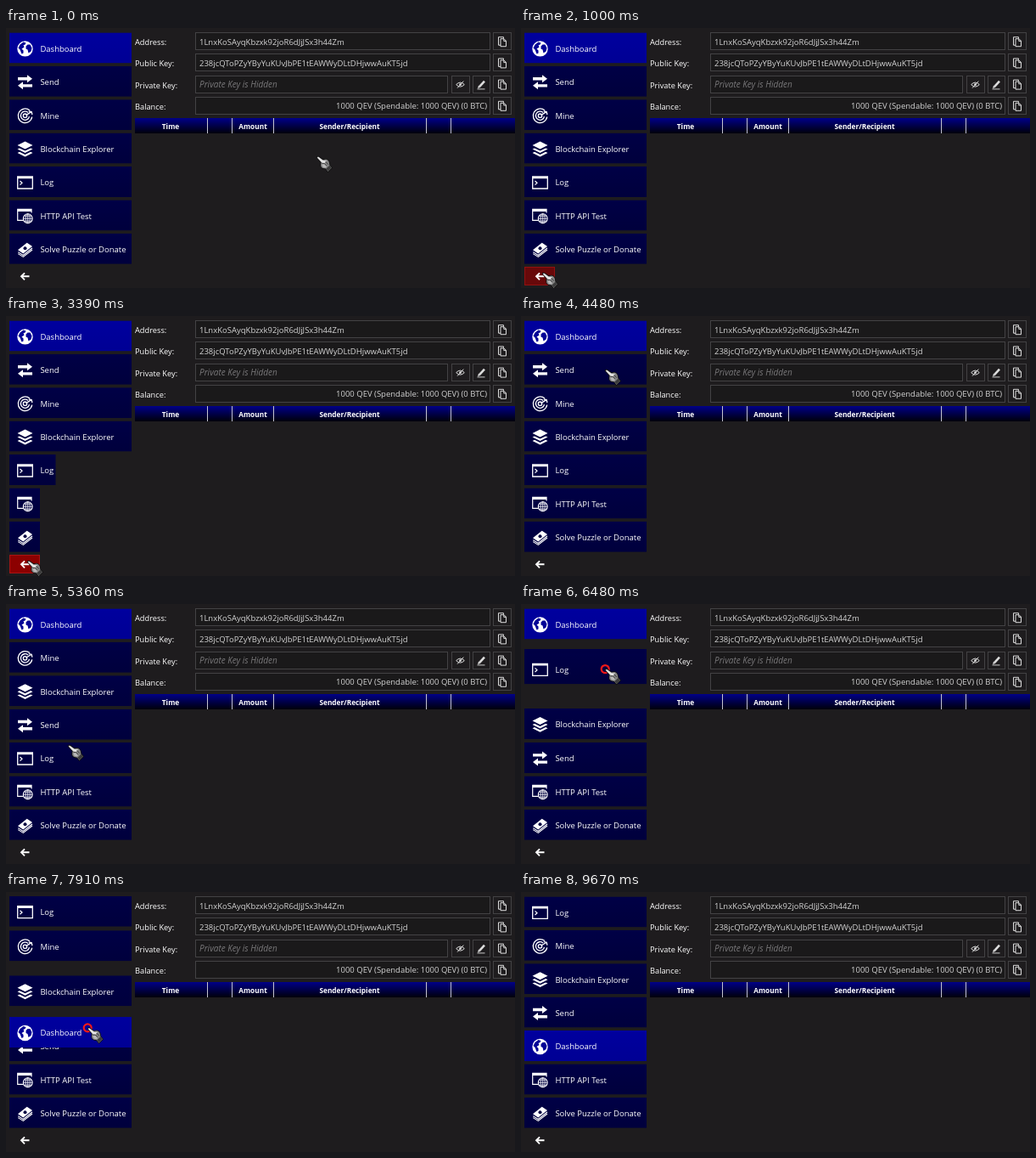
These frames come from a looping animation (600 px wide and 306 px high, 9.73 s). An HTML page with a canvas:

```html
<!DOCTYPE html>
<html lang="en">
<head>
<meta charset="utf-8">
<title>Wallet dashboard</title>
<style>
  html, body { margin: 0; width: 100%; height: 100%; overflow: hidden; background: #1e1c1e; }
  canvas { display: block; width: 600px; height: 306px; }
</style>
</head>
<body>
<canvas id="stage"></canvas>
<script>
const LOOP = 9.73, PITCH = 39.4, TOP = 5.4, ITEM_H = 36, WIDE = 144, NARROW = 36;
const BG = '#1e1c1e', SANS = '"Open Sans", "Noto Sans", sans-serif';
const canvas = document.getElementById('stage');
const c = canvas.getContext('2d');
const dpr = window.devicePixelRatio || 1;
canvas.width = 600 * dpr;
canvas.height = 306 * dpr;

const clamp = (v, a = 0, b = 1) => Math.min(b, Math.max(a, v));
const ramp = (t, start, len) => clamp((t - start) / len);
const mix = (a, b, k) => a + (b - a) * k;
const rowTop = row => TOP + row * PITCH;

// Damped spring, three oscillations.
function elastic(k) {
  const x = 1 - clamp(k);
  return 1 - (Math.exp(3 * x) - 1) / (Math.exp(3) - 1) * Math.sin(6.5 * Math.PI * x);
}

// Pointer path: seconds, x, y
const path = [
  [0, 366, 151], [.12, 366, 151], [.35, 290, 75], [.6, 150, 120], [.95, 25, 288], [3.62, 25, 288],
  [3.8, 130, 150], [3.95, 250, 16], [4.12, 297, 44], [4.27, 195, 66], [4.45, 99, 63], [4.55, 99, 63],
  [4.65, 98, 84], [4.78, 97, 124], [4.92, 97, 145], [5.02, 97, 145], [5.36, 73, 166], [5.68, 98, 181],
  [5.78, 98, 181], [5.93, 98, 161], [6.14, 98, 122], [6.48, 99, 76.5], [6.62, 100, 58], [6.72, 100, 58],
  [6.99, 143, 40], [7.1, 211, 24], [7.3, 96, 18], [7.4, 96, 18], [7.55, 96, 60], [7.755, 96, 124],
  [7.91, 96, 159.5], [7.99, 96, 165], [8.2, 96, 176], [8.32, 96, 176], [9.03, 244, 176], [9.73, 244, 176]
];

function slope(i, axis) {
  const a = path[i - 1], b = path[i], d = path[i + 1];
  if (!a || !d || (b[1] === a[1] && b[2] === a[2]) || (b[1] === d[1] && b[2] === d[2])) return 0;
  return (d[axis] - a[axis]) / (d[0] - a[0]);
}

function pointer(t) {
  let i = 0;
  while (i < path.length - 2 && path[i + 1][0] <= t) i++;
  const a = path[i], b = path[i + 1], len = b[0] - a[0], k = ramp(t, a[0], len);
  const at = axis => {
    const k2 = k * k, k3 = k2 * k;
    return (2 * k3 - 3 * k2 + 1) * a[axis] + (3 * k2 - 2 * k3) * b[axis] +
      len * ((k3 - 2 * k2 + k) * slope(i, axis) + (k3 - k2) * slope(i + 1, axis));
  };
  return { x: at(1), y: at(2) };
}

const labels = ['Dashboard', 'Send', 'Mine', 'Blockchain Explorer', 'Log', 'HTTP API Test', 'Solve Puzzle or Donate'];
const drags = [
  { item: 1, row: 1, start: 4.52, end: 5.02 },
  { item: 4, row: 4, start: 5.75, end: 6.72 },
  { item: 0, row: 0, start: 7.37, end: 8.32 }
];
// Seconds, item, new row
const moves = [
  [4.65, 2, 1], [4.78, 3, 2], [5.02, 1, 3],
  [5.93, 1, 4], [6.14, 3, 3], [6.468, 2, 2], [6.72, 4, 1],
  [7.5, 4, 0], [7.64, 2, 1], [7.755, 3, 2], [7.985, 1, 3], [8.32, 0, 4]
];
const clicks = [[1.42, 1.54], [2.66, 2.78]];

const dragTop = (d, t) => rowTop(d.row) + pointer(t).y - pointer(d.start).y;
const activeDrag = t => drags.find(d => t >= d.start && t < d.end);

function itemTop(item, t) {
  const held = activeDrag(t);
  if (held && held.item === item) return dragTop(held, t);
  let y = rowTop(item), target = y;
  for (const [at, who, row] of moves) {
    if (who !== item || t < at) continue;
    const drop = drags.find(d => d.item === item && d.end === at);
    const from = drop ? dragTop(drop, at) : target;
    target = rowTop(row);
    y = mix(from, target, elastic((t - at) / .5));
  }
  return y;
}

function itemWidth(i, t) {
  const open = 1 - ramp(t, 1.5 + (6 - i) * .15, .15) + ramp(t, 2.765 + i * .15, .15);
  return mix(NARROW, WIDE, open);
}

function text(s, x, y, { size = 9.5, color = '#fff', align = 'left', style = '' } = {}) {
  c.font = `${style} ${size}px ${SANS}`;
  c.fillStyle = color;
  c.textAlign = align;
  c.textBaseline = 'alphabetic';
  c.fillText(s, x, y + size * .36);
}

function gradient(y, h, from, to) {
  const g = c.createLinearGradient(0, y, 0, y + h);
  g.addColorStop(0, from);
  g.addColorStop(1, to);
  return g;
}

const fill = (d, color = '#fff') => { c.fillStyle = color; c.fill(new Path2D(d)); };
function line(d, w = 1.2, color = '#fff') {
  c.strokeStyle = color;
  c.lineWidth = w;
  c.stroke(new Path2D(d));
}
function circle(x, y, r, color, w) {
  c.beginPath();
  c.arc(x, y, r, 0, 2 * Math.PI);
  if (w) { c.strokeStyle = color; c.lineWidth = w; c.stroke(); }
  else { c.fillStyle = color; c.fill(); }
}

// Menu icons, centred on the origin
const icons = [
  () => {
    circle(0, 0, 9.2, '#fff');
    fill('M-6 -5L-2 -8L1 -7L0 -5L-2 -4L-1 -2L-4 0L-2 2L-2 5L-4 6L-6 1L-8 -1Z', '#000096');
    fill('M3 -5L6 -5L8 -1L7 3L4 5L3 1L1 0L1 -3Z', '#000096');
  },
  () => {
    fill('M-8.5 -5.8H2.5V-8.5L8.5 -4L2.5 .5V-2.4H-8.5Z');
    fill('M8.5 2.4H-2.5V-.5L-8.5 4L-2.5 8.5V5.8H8.5Z');
  },
  () => {
    line('M5.5 -6.2A8.3 8.3 0 1 0 8.2 1.5', 1.3);
    line('M3.4 -3.8A5.1 5.1 0 1 0 5 1', 1.3);
    circle(0, 0, 2.2, '#fff', 1.3);
    line('M1 -.6L7.5 -4.6M8.4 -1.2L7.6 -4.6L4.2 -5.2', 1.3);
  },
  () => {
    fill('M0 -9L9 -4.5L0 0L-9 -4.5Z');
    for (const y of [0, 4.4]) fill(`M-9 ${y}L-6.5 ${y - 1.2}L0 ${y + 2}L6.5 ${y - 1.2}L9 ${y}L0 ${y + 4.5}Z`);
  },
  () => {
    line('M-8.8 -7H8.8V7H-8.8Z', 1.3);
    line('M-8.8 -5.8H8.8', 2);
    line('M-6 -2L-3.5 .3L-6 2.6', 1.2);
  },
  () => {
    line('M-2 5H-8.8V-8H7.5V-4', 1.2);
    line('M-8.8 -6.4H7.5', 1.8);
    circle(3.2, 2.8, 5.8, '#000042');
    circle(3.2, 2.8, 5.4, '#fff', 1.1);
    line('M-2.2 2.8H8.6M3.2 -2.6V8.2M-1 -.2H7.4M-1 5.8H7.4', .8);
    c.beginPath();
    c.ellipse(3.2, 2.8, 2.6, 5.4, 0, 0, 2 * Math.PI);
    c.stroke();
  },
  () => {
    fill('M-8.5 .5L2.2 -8L8.5 -3.8L-2.2 4.7Z');
    circle(0, -1.6, 2, '#000042');
    line('M-8.3 2.8L-2.2 6.7L8.5 -1.8', 1.1);
    line('M-8.3 4.8L-2.2 8.6L8.5 .2', 1.1);
  }
];

function at(x, y, draw) {
  c.save();
  c.translate(x, y);
  draw();
  c.restore();
}

function menuItem(i, t) {
  const y = itemTop(i, t), w = itemWidth(i, t), mid = y + ITEM_H / 2 + 1;
  c.save();
  c.beginPath();
  c.rect(4, y, w, ITEM_H);
  c.clip();
  c.fillStyle = i ? gradient(y, ITEM_H, '#000046', '#00003c') : gradient(y, ITEM_H, '#00009e', '#000094');
  c.fillRect(4, y, w, ITEM_H);
  at(22.5, mid, icons[i]);
  text(labels[i], 40.4, mid);
  c.restore();
}

function menu(t) {
  const held = activeDrag(t);
  c.save();
  c.beginPath();
  c.rect(0, 5, 150, 301);
  c.clip();
  for (let i = 6; i >= 0; i--) if (!held || held.item !== i) menuItem(i, t);
  if (held) menuItem(held.item, t);
  c.restore();
}

function toggle(t) {
  const hover = ramp(t, .92, .12) * (1 - ramp(t, 3.7, .35));
  c.globalAlpha = hover;
  c.fillStyle = '#8c0000';
  c.fillRect(4, 281, 36, 22);
  c.strokeStyle = '#a81414';
  c.lineWidth = 1;
  c.strokeRect(4.5, 281.5, 35, 21);
  c.globalAlpha = 1;
  at(22, 292, () => {
    if (t >= 1.5 && t < 2.74) {
      line('M2.5 -2.5V-4.5H-4.5V4.5H2.5V2.5', 1.1);
      line('M-2 0H5M2.8 -2.3L5.2 0L2.8 2.3', 1.2);
    } else line('M5.5 .3H-4M0 -3.7L-4 .3L0 4.3', 1.9);
  });
}

function box(x, y, w, h, color = '#1a191a') {
  c.fillStyle = color;
  c.fillRect(x, y, w, h);
  c.strokeStyle = '#434244';
  c.lineWidth = 1;
  c.strokeRect(x + .5, y + .5, w - 1, h - 1);
}

function copyIcon() {
  line('M-2 4H-4.5V-5.5H1.5V-4', 1, '#ddd');
  line('M-2 -3.5H2L4.5 -1V5.5H-2ZM1.8 -3.5V-.8H4.5', 1, '#ddd');
}
function eyeIcon() {
  line('M-4.8 0Q0 -5 4.8 0Q0 5 -4.8 0Z', 1, '#ddd');
  circle(0, 0, 1.4, '#ddd');
  line('M-3.4 4L3.8 -4', 1, '#ddd');
}
function penIcon() {
  line('M-2 2L3.5 -4', 2.6, '#ddd');
  fill('M-4.5 4.5L-3.4 .8L-.8 3.2Z', '#ddd');
  line('M-5 5.3H4', .9, '#ddd');
}

const fields = [
  ['Address:', '1LnxKoSAyqKbzxk92joR6dJjJSx3h44Zm'],
  ['Public Key:', '238jcQToPZyYByYuKUvJbPE1tEAWWyDLtDHjwwAuKT5jd'],
  ['Private Key:', 'Private Key is Hidden'],
  ['Balance:', '1000 QEV (Spendable: 1000 QEV) (0 BTC)']
];

function panel(shift) {
  const left = 223 - shift;
  fields.forEach(([label, value], i) => {
    const mid = 16.2 + i * 25.2, y = Math.floor(mid - 10.5);
    text(label, 152 - shift, mid + .7, { size: 9.25 });
    box(left, y, (i === 2 ? 521 : 571) - left, 21);
    box(574, y, 22, 21, BG);
    at(585, mid, copyIcon);
    if (i === 2) {
      text(value, left + 5, mid + .2, { size: 10, style: 'italic', color: '#79787a' });
      box(525, y, 22, 21, BG);
      box(550, y, 21, 21, BG);
      at(535.5, mid, eyeIcon);
      at(560.5, mid, penIcon);
    } else if (i === 3) text(value, 567, mid, { align: 'right', color: '#d4d4d4' });
    else text(value, left + 5, mid, { color: '#d4d4d4' });
  });
  c.fillStyle = gradient(106, 18, '#000088', '#00000a');
  c.fillRect(152 - shift, 106, 448 + shift, 18);
  c.fillStyle = '#c4c4d0';
  for (const x of [237, 266, 315, 495, 524]) c.fillRect(x - shift, 106, 1, 18);
  for (const [s, x] of [['Time', 194], ['Amount', 291], ['Sender/Recipient', 405]])
    text(s, x - shift, 115.6, { size: 8.3, style: 'bold', align: 'center' });
}

function hand(t) {
  if (t >= 9.67) return;
  const p = pointer(t);
  const pressed = activeDrag(t) || clicks.some(([a, b]) => t >= a && t < b);
  at(p.x, p.y, () => {
    c.lineJoin = c.lineCap = 'round';
    if (pressed) circle(.2, .2, 4.5, '#f01818', 2.2);
    const glove = 'M.5 1.2Q1 0 2.5 .6L7.5 4.2L11 3.6Q14.5 4.5 15 8L15.4 10.5L18 13.5L13.5 18L11 14.6L7.5 14Q4.6 12.5 5.2 9.5L5.6 7Z';
    line(glove, 1.5, '#0c0c0c');
    fill(glove, '#858585');
    fill('M.8 1.4L2.4 .9L8 5L12 5.2L9 8.5L6 7Z', '#e6e6e6');
    fill('M6 9.5L9.5 9L12 12L11 13.5L7.8 13Z', '#b8b8b8');
    line('M7 8.6L9 8.3L11.8 11M11 6.6L13.6 9.4', .9, '#333');
    fill('M15.4 10.7L17.8 13.5L13.6 17.6L11.4 14.6Z', '#3c3c3c');
  });
}

function draw(t) {
  c.setTransform(dpr, 0, 0, dpr, 0, 0);
  c.lineJoin = 'miter';
  c.lineCap = 'butt';
  c.fillStyle = BG;
  c.fillRect(0, 0, 600, 306);
  const widest = Math.max(...labels.map((_, i) => itemWidth(i, t)));
  panel(WIDE - widest);
  menu(t);
  toggle(t);
  hand(t);
}

const begin = performance.now();
function tick() {
  draw((performance.now() - begin) / 1000 % LOOP);
  requestAnimationFrame(tick);
}
tick();
</script>
</body>
</html>
```
